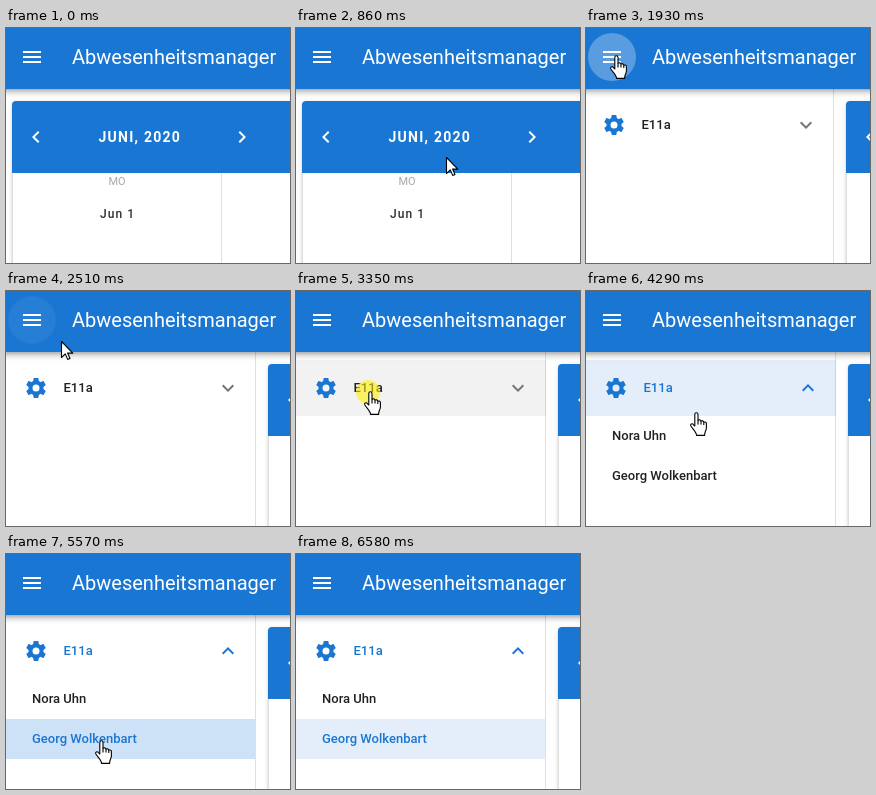
Animation of 284x235 px, one loop 7.26 s. Source, as an HTML page:

```html
<!DOCTYPE html>
<html lang="de">
<head>
<meta charset="utf-8">
<title>Abwesenheitsmanager</title>
<style>
  html, body { margin: 0; width: 100%; height: 100%; overflow: hidden; background: #fff; }
  #stage { position: relative; width: 284px; height: 235px; overflow: hidden; background: #fff; }
  #stage div, svg { position: absolute; }
  svg { left: 0; top: 0; width: 284px; height: 235px; overflow: visible; }
  text { font-family: Roboto, sans-serif; font-weight: 500; white-space: pre; }
  #page, #drawer { left: 0; top: 0; width: 284px; height: 235px; }
  #card {
    left: 6px; top: 73px; width: 700px; height: 400px; border-radius: 4px; background: #fff;
    box-shadow: 0 3px 1px -2px #0003, 0 2px 2px #00000024, 0 1px 5px #0000001f;
  }
  #month { width: 100%; height: 72px; background: #1976d2; border-radius: 4px 4px 0 0; }
  #panel {
    left: -6px; top: 61px; width: 256px; height: 174px; box-sizing: border-box;
    background: #fff; border-right: 1px solid #e0e0e0;
  }
  #bar {
    left: -20px; top: -3px; width: 324px; height: 64px; background: #1976d2;
    box-shadow: 0 2px 4px -1px #0003, 0 4px 5px #00000024, 0 1px 10px #0000001f;
  }
  .list text { font-size: 13px; }
  .middle { text-anchor: middle; }
  .cursor { fill: #fff; stroke: #000; stroke-width: 1.1; stroke-linejoin: round; }
</style>
</head>
<body>
<div id="stage">
  <div id="page">
    <div id="card"><div id="month"></div></div>
    <svg>
      <path d="M6.5 145V235M215.5 145V235" stroke="#e0e0e0"/>
      <g fill="#fff">
        <path transform="translate(18 97)" d="M15.4 16.6 10.8 12 15.4 7.4 14 6 8 12 14 18Z"/>
        <path transform="translate(224 97)" d="M8.6 16.6 13.2 12 8.6 7.4 10 6 16 12 10 18Z"/>
        <text x="92.5" y="114" font-size="14" letter-spacing="1.25" style="font-weight:700">JUNI, 2020</text>
      </g>
      <text class="middle" x="111" y="157" font-size="11" fill="#a8a8a8" style="font-weight:400">MO</text>
      <text x="94" y="190" font-size="12" letter-spacing="1.07" fill="#303030">Jun 1</text>
    </svg>
  </div>

  <div id="drawer">
    <div id="panel"></div>
    <svg class="list">
      <defs>
        <clipPath id="reveal"><rect id="revealBox" y="125" width="249" height="0"/></clipPath>
        <clipPath id="rowClip"><rect y="165" width="250" height="40"/></clipPath>
      </defs>
      <rect id="groupBg" x="-6" y="69" width="256" height="56"/>
      <g id="gear" transform="translate(30 97)" fill="#1976d2">
        <circle r="5.5" fill="none" stroke="#1976d2" stroke-width="4"/>
      </g>
      <text id="groupName" x="57.5" y="101">E11a</text>
      <path id="arrowDown" d="M-4.6-3.4 0 1.2 4.6-3.4 6-2 0 4-6-2Z"/>
      <g clip-path="url(#reveal)">
        <rect id="firstBg" x="-6" y="125" width="256" height="40"/>
        <rect id="secondBg" x="-6" y="165" width="256" height="40"/>
        <circle id="rowRipple" cx="94" cy="186" fill="#1976d2" clip-path="url(#rowClip)"/>
        <text x="26" y="149" fill="#212121">Nora Uhn</text>
        <text id="secondName" x="26" y="189">Georg Wolkenbart</text>
      </g>
    </svg>
  </div>

  <div id="bar"></div>
  <svg>
    <circle id="halo" cx="26" cy="29" r="24" fill="#fff"/>
    <path d="M17 24H35M17 29H35M17 34H35" stroke="#fff" stroke-width="2"/>
    <text x="66" y="36" font-size="20" fill="#fff" style="font-weight:400">Abwesenheitsmanager</text>
    <g id="pointer">
      <circle id="click" cx="-1" cy="1" r="12" fill="#ffee00" opacity=".58"/>
      <g id="hand" class="cursor" transform="translate(-5 0)">
        <path d="M4.8 14V2.4C4.8 .2 8 .2 8 2.4V8.5C8.4 7.4 11 7.6 11 9.3 11.6 8.4 13.8 8.7 13.8 10.3 14.6 9.6 16.4 10 16.4 11.6V16C16.4 18.5 14.6 19.5 14.6 23.4H6.6C6.6 20.5 3.6 18 .9 14-.2 12.2 2.3 10.8 3.6 12.8Z"/>
        <path d="M8 8.5V12.5M11 9.3V12.5M13.8 10.3V13"/>
      </g>
      <path id="arrow" class="cursor" d="M.5 .5V16.5L4.3 12.9 6.7 18.4 9 17.4 6.6 12.1H11.8Z"/>
    </g>
  </svg>
</div>
<script>
const LOOP = 7260, STEP = 60;
const BLUE = [25, 118, 210];
const $ = id => document.getElementById(id);

// Motion runs in bursts, each drawn in steps of 60 ms.
const bursts = [0, 600, 1330, 1510, 1690, 2210, 2390, 3350, 4100, 5180, 6270];
const clicks = [1690, 3350, 5180];

const cursorPath = [
  [600, 226, 203], [800, 165, 142], [1000, 88, 76], [1260, 34, 29],
  [1330, 30, 28], [1509, 30, 28], [1510, 29, 27],
  [2330, 29, 27], [2600, 68, 62], [2810, 83, 88], [2990, 73, 100],
  [4040, 73, 100], [4280, 109, 121], [4460, 122, 144], [4640, 109, 172], [4810, 94, 186],
  [6210, 94, 186], [6330, 130, 194], [6510, 265, 217]
];

for (let angle = 0; angle < 360; angle += 60) {
  $('gear').insertAdjacentHTML('beforeend',
    `<path transform="rotate(${angle})" d="M-2.9-6.5-2.4-9.6Q-2.3-10-1.9-10H1.9Q2.3-10 2.4-9.6L2.9-6.5Z"/>`);
}

const clamp = v => Math.min(1, Math.max(0, v));
const ramp = (t, from, to) => clamp((t - from) / (to - from));
const pulse = (t, inA, inB, outA, outB) => ramp(t, inA, inB) - ramp(t, outA, outB);
const mix = (a, b, p) => a.map((v, i) => v + (b[i] - v) * p);
const rgb = c => `rgb(${c.map(Math.round)})`;
const set = (id, attrs) => {
  for (const key in attrs) $(id).setAttribute(key, attrs[key]);
};

// cubic-bezier(.4, 0, .2, 1)
function ease(x) {
  let low = 0, high = 1, s = .5;
  for (let i = 0; i < 20; i++) {
    s = (low + high) / 2;
    const at = 1.2 * s * (1 - s) ** 2 + .6 * s * s * (1 - s) + s ** 3;
    if (at < x) low = s; else high = s;
  }
  return s * s * (3 - 2 * s);
}

function along(path, t) {
  const next = path.findIndex(p => p[0] > t);
  if (next < 0) return path[path.length - 1].slice(1);
  if (next === 0) return path[0].slice(1);
  const a = path[next - 1], b = path[next];
  return mix(a.slice(1), b.slice(1), ramp(t, a[0], b[0]));
}

function snap(t) {
  const start = bursts.filter(b => b <= t).pop();
  return start + Math.floor((t - start) / STEP) * STEP;
}

function drawPointer(t) {
  const [x, y] = along(cursorPath, t).map(Math.round);
  const onMenu = Math.hypot(x - 26, y - 29) < 24;
  const onList = t > 2050 && x < 250 && y >= 69 && y < 205;
  const show = (id, on) => set(id, { visibility: on ? 'visible' : 'hidden' });
  const visible = t >= 600 && t < 6560;
  set('pointer', { transform: `translate(${x} ${y})` });
  show('hand', visible && (onMenu || onList));
  show('arrow', visible && !onMenu && !onList);
  show('click', clicks.some(c => t >= c && t < c + 120));
}

function drawDrawer(t) {
  const open = ease(ramp(t, 1690, 1960));
  const shift = Math.round(256 * open);
  $('page').style.transform = `translateX(${shift}px)`;
  $('drawer').style.transform = `translateX(${shift - 256}px)`;

  const unfold = ease(ramp(t, 3390, 3710));
  const active = ramp(t, 3350, 3530);
  const hover = ramp(t, 2600, 2840);
  set('groupBg', {
    fill: rgb(mix([0, 0, 0], BLUE, active)),
    opacity: (.05 * hover + .07 * active) * (1 - ramp(t, 4310, 4550))
  });
  set('groupName', { fill: rgb(mix([33, 33, 33], BLUE, active)) });
  set('arrowDown', {
    fill: rgb(mix([117, 117, 117], BLUE, active)),
    transform: `translate(222 97) rotate(${-180 * unfold})`
  });
  set('revealBox', { height: 80 * unfold });
}

function drawItems(t) {
  const chosen = ramp(t, 5180, 5420);
  set('firstBg', { opacity: .04 * pulse(t, 4310, 4520, 4600, 4800) });
  set('secondBg', {
    fill: rgb(mix([0, 0, 0], BLUE, chosen)),
    opacity: .04 * ramp(t, 4600, 4800) + .08 * chosen
  });
  set('secondName', { fill: rgb(mix([33, 33, 33], BLUE, chosen)) });
  set('rowRipple', {
    r: 160 * ease(ramp(t, 5180, 5480)),
    opacity: .1 * (1 - ramp(t, 5580, 5700))
  });
}

function drawHalo(t) {
  const ripple = t < 2210 ? .2 * ramp(t, 1690, 1870) : 0;
  set('halo', { opacity: .08 * pulse(t, 1200, 1380, 2450, 2630) + ripple });
}

function frame(now) {
  const t = snap(now % LOOP);
  drawPointer(t);
  drawDrawer(t);
  drawItems(t);
  drawHalo(t);
}

const began = performance.now();
(function tick() {
  frame(performance.now() - began);
  requestAnimationFrame(tick);
})();
</script>
</body>
</html>
```
